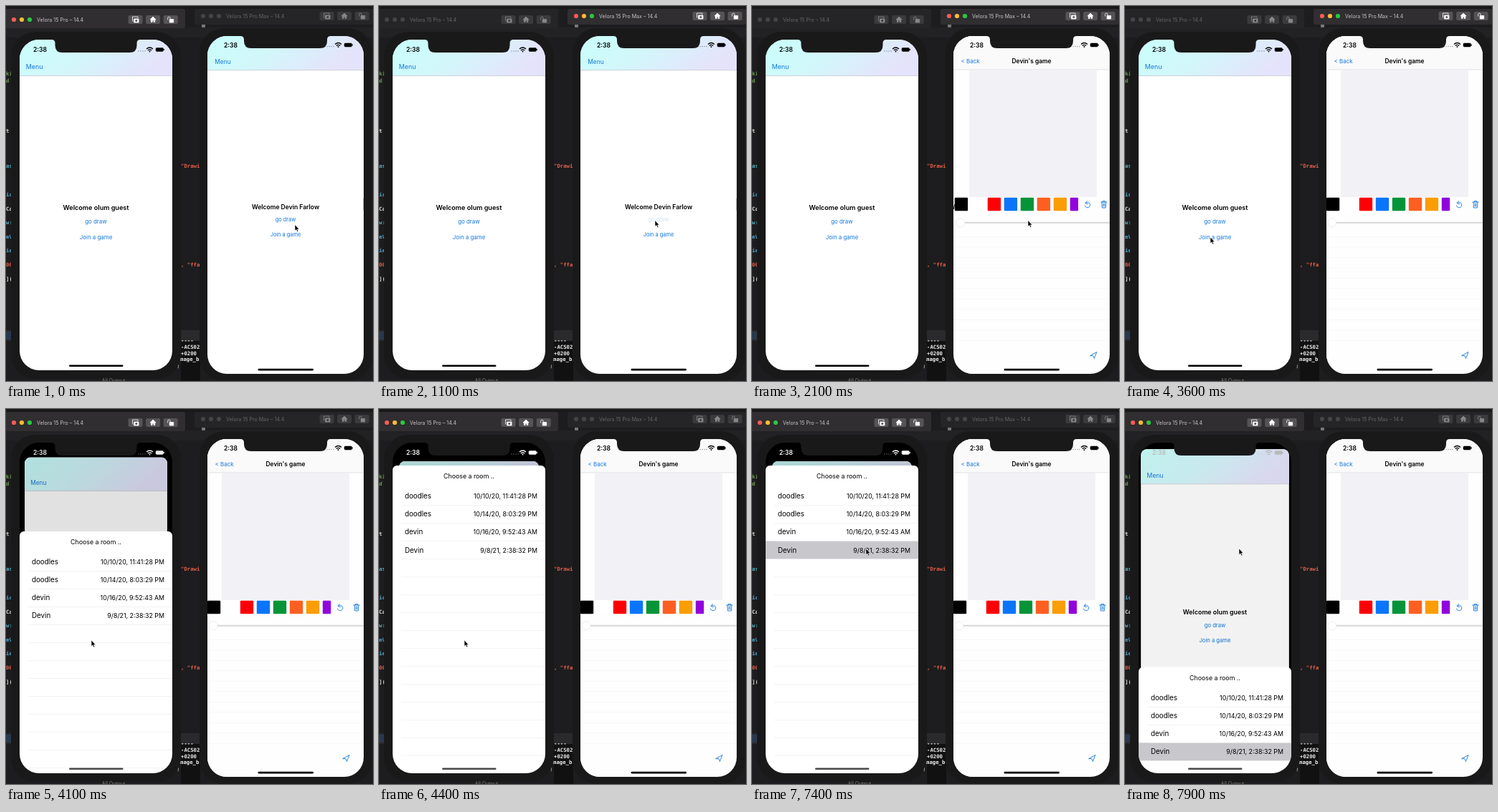
An HTML page that plays this animation: 512x524 px, repeating every 8 s.

```html
<!DOCTYPE html>
<html lang="en">
<head>
<meta charset="utf-8">
<style>
html, body { margin: 0; width: 100%; height: 100%; overflow: hidden; background: #1d1c1e; }
svg { display: block; font-family: Inter, sans-serif; }
.code { font: bold 7.3px "DejaVu Sans Mono", monospace; }
.mid { text-anchor: middle; }
.end { text-anchor: end; }
.bold { font-weight: 600; }
.link { fill: #1478dc; }
.icon { fill: none; stroke: #1478dc; stroke-width: .9; stroke-linejoin: round; stroke-linecap: round; }
</style>
</head>
<body>
<script>
const BEZEL = '#1a191a';
const text = (x, y, size, str, cls = '', attrs = '') =>
  `<text x="${x}" y="${y}" font-size="${size}" class="${cls}" ${attrs}>${str}</text>`;
const rect = (x, y, w, h, fill, r = 0, attrs = '') =>
  `<rect x="${x}" y="${y}" width="${w}" height="${h}" rx="${r}" fill="${fill}" ${attrs}/>`;
const lines = (x, w, y, step, n, fill) =>
  Array.from({ length: n }, (_, i) => rect(x, y + i * step, w, .6, fill)).join('');

function titleBar(id, x, y, w, buttonX, title) {
  const lights = ['#fe5b53', '#fdbc2e', '#2ac840'].map((c, i) =>
    `<circle class="light" data-color="${c}" cx="${x + 11 * i}" cy="${y}" r="3.1"/>`).join('');
  const glyphs = [
    '<path d="M-4 2.500V-4H3.500V-2" fill="none"/><path d="M-2-1H4.500V4H-2Z" fill="#fff"/><circle cx="1.300" cy="1.500" r="1.500" fill="#555355" stroke="none"/>',
    '<path d="M-4 0 0-4 4 0H2.700V3.500H1V1H-1V3.500H-2.700V0Z" fill="#fff"/>',
    '<path d="M-1.500-.5H4V4H-1.500Z" fill="#fff"/><path d="M-4 .5V-2q0-2 1.700-2T-.5-2V-.5" fill="none"/>'
  ];
  const buttons = glyphs.map((g, i) => {
    const bx = buttonX + 24.6 * i;
    return rect(bx, y - 6, 20, 12, '#555355', 2) +
      `<g transform="translate(${bx + 10} ${y})" stroke="#fff" stroke-width=".8">${g}</g>`;
  }).join('');
  return `<g id="${id}">${rect(x - 12, 4, w, y + 8, '#302e30', 3, 'class="bar"')}${lights}
    ${text(x + 32, y + 2.6, 7.1, title, 'title', 'fill="#c9c7c9"')}<g class="buttons">${buttons}</g></g>`;
}

function notch(cx, half, y, h) {
  const a = cx - half, b = cx + half;
  return `<path fill="${BEZEL}" d="M${a - 5} ${y - 2}V${y}Q${a} ${y} ${a} ${y + 5}V${y + h - 10}q0 10 10 10
    H${b - 10}q10 0 10-10V${y + 5}q0-5 5-5V${y - 2}Z"/>`;
}

// Clock, signal dots, wifi and battery; y is the vertical centre.
const status = (id, x, right, y) => `<g id="${id}">
  ${text(x, y + 3.1, 8.6, '2:38', 'bold')}
  ${[0, 3, 6, 9].map(d => `<circle cx="${right - 35 + d}" cy="${y + 2}" r=".7" opacity=".45"/>`).join('')}
  <path d="M${right - 24} ${y - 1}q4.500-4 9 0M${right - 22.2} ${y + 1}q2.700-2.200 5.400 0" fill="none" stroke="currentColor" stroke-width="1.3"/>
  <circle cx="${right - 19.5}" cy="${y + 2.4}" r="1"/>
  <rect x="${right - 11}" y="${y - 2.5}" width="10.500" height="5" rx="1.400" stroke="currentColor" stroke-width=".5"/>
  <path d="M${right + .3} ${y - 1}v2" stroke="currentColor"/></g>`;

function home(id, x, y, w, h, bar, s, name, menuX, titleY) {
  const cx = x + w / 2;
  return rect(x, y, w, h, '#fff') + rect(x, y, w, bar, 'url(#sky)') + rect(x, y + bar, w, .7, '#b9bec8') +
    text(menuX, y + bar - 8.7 * s, 8.9 * s, 'Menu', 'link') +
    text(cx, titleY, 9.1 * s, `Welcome ${name}`, 'mid bold') +
    text(cx, titleY + 18.8 * s, 7.9 * s, 'go draw', 'mid link', `id="${id}Draw"`) +
    text(cx, titleY + 40.8 * s, 7.9 * s, 'Join a game', 'mid link', `id="${id}Join"`);
}

const swatches = ['#000', '#fff', '#fd0006', '#0a75fb', '#079439', '#fd5f21', '#fb9d04', '#9102dc'];
const game = `<g id="game">
  ${rect(281, 42, 218, 472, '#fefefe')}${rect(301, 90, 178, 177, '#f2f1f6')}
  ${swatches.map((c, i) => rect(280.8 + 23 * i, 267.8, i == 7 ? 11.4 : 18.4, 18.4, c, 1.2)).join('')}
  <path class="icon" d="M463.500 275.500a3.700 3.700 0 1 1-1 3.500M465.500 272.500 463 275.500l3.500 1.200"/>
  <path class="icon" d="M485 274h8M487.500 274v-1.500h3V274M486 274l.6 8h4.800l.6-8M488.200 276v4M489.900 276v4"/>
  ${rect(288, 301.8, 211, 2, '#d6d6d6', 1)}
  <circle cx="289" cy="303" r="6" fill="#fff" stroke="#e6e6e6" stroke-width=".7"/>
  ${lines(281, 218, 322, 14.5, 11, '#f6f6f7')}
  <path class="icon" d="M470 488.500 479 483.500 475.500 492.500 474 489Z"/></g>
  <g id="gameNav">${rect(281, 42, 218, 47, '#fafafb')}${rect(281, 88.6, 218, .7, '#d4d4d6')}
  ${text(291.5, 80, 8, '&lt; Back', 'link')}${text(390, 80.3, 8.4, "Devin's game", 'mid bold')}</g>`;

const rooms = [['doodles', '10/10/20, 11:41:28 PM'], ['doodles', '10/14/20, 8:03:29 PM'],
  ['devin', '10/16/20, 9:52:43 AM'], ['Devin', '9/8/21, 2:38:32 PM']];
const sheet = `<g id="sheet">${rect(19, 79, 213, 460, '#fff', 6)}
  ${rect(19, 184.5, 213, 25, '#c8c7cc', 0, 'id="picked"')}
  ${text(125.5, 97, 8.8, 'Choose a room ..', 'mid')}
  ${lines(31, 201, 134.5, 25, 15, '#e9e9eb')}
  ${rooms.map(([name, date], i) => text(36, 125.2 + 25.1 * i, 9.8, name) +
    text(221, 125.2 + 25.1 * i, 8.85, date, 'end')).join('')}</g>`;

const snippets = [
  [0, 97, '#6a9a50', 'ki'], [0, 107, '#6a9a50', 'd'], [0, 177, '#ddd', 't'], [0, 226, '#4fb0bc', 'as'],
  [0, 266, '#4fa8d0', 'ic'], [0, 286, '#ddd', 'Ca'], [0, 305, '#4fb0bc', 'w:'], [0, 325, '#4fa8d0', 'eV'],
  [0, 344, '#4fa8d0', 'ie'], [0, 364, '#e0604a', '00'], [0, 384, '#ddd', ']('],
  [244, 226, '#e0604a', '"Drawi'], [244, 364, '#e0604a', ', "ffa'],
  [244, 470, '#eee', ' ----'], [244, 479, '#eee', '-ACS02'], [244, 488, '#eee', '+0200'], [243, 496, '#eee', 'mage_b.'], [238, 506, '#eee', '!']
];

document.body.innerHTML = `<svg width="512" height="524" viewBox="0 0 512 524"><defs>
  <linearGradient id="sky" x2="1" y2=".25"><stop stop-color="#c8fffb"/><stop offset=".5" stop-color="#d3f6fb"/><stop offset="1" stop-color="#e5e3fb"/></linearGradient>
  <clipPath id="leftClip">${rect(19, 47, 213, 462, '#fff', 27)}</clipPath>
  <clipPath id="backClip">${rect(19, 47, 213, 500, '#fff', 9)}</clipPath>
  <clipPath id="rightClip">${rect(281, 42, 218, 472, '#fff', 27)}</clipPath></defs>
  ${rect(0, 0, 512, 524, '#1d1c1e')}${rect(0, 0, 512, 4, '#1a191a')}
  ${rect(0, 30, 512, 14, '#222123')}${rect(0, 453, 271, 15, '#2a292b')}${rect(0, 455, 7, 11, '#28384e')}${rect(244, 468, 27, 56, '#111')}
  ${snippets.map(([x, y, c, s]) => text(x, y, 7.3, s, 'code', `fill="${c}"`)).join('')}
  ${rect(7, 36, 237, 485, BEZEL, 34)}${rect(270, 31, 241, 493, BEZEL, 34)}
  ${text(150, 526, 7, 'All Output', 'mid', 'fill="#777"')}
  <circle cx="248" cy="8" r="1.300" fill="#b8a040"/>${rect(273, 25, 5, 5, '#777', 1)}
  ${titleBar('leftBar', 11, 19, 251, 170.5, 'Velora 15 Pro – 14.4')}
  ${titleBar('rightBar', 275, 14, 249, 437.5, 'Velora 15 Pro Max – 14.4')}
  <g clip-path="url(#leftClip)">${rect(19, 47, 213, 462, '#000')}
    <g id="back"><g id="backScreen">${home('left', 19, 47, 213, 462, 50, 1, 'olum guest', 27.8, 284.7)}
    ${rect(19, 47, 213, 500, '#000', 0, 'id="shade"')}</g></g>
    ${status('leftStatus', 38, 220, 61)}${sheet}${rect(88, 501.5, 75.5, 2.6, '#000', 1.3, 'id="leftHome"')}</g>
  ${notch(125.5, 57, 47, 18)}
  <g clip-path="url(#rightClip)"><g id="rightBack">${home('right', 281, 42, 218, 472, 47, .94, 'Devin Farlow', 291.3, 283.8)}</g>
    ${game}${status('rightStatus', 304, 483, 54.5)}${rect(351.5, 506.8, 77.5, 2.6, '#000', 1.3)}</g>
  ${notch(390, 58, 42, 17)}
  <path id="cursor" d="M0 0V8.600L2 6.900 3.400 10 4.800 9.400 3.500 6.400H6Z" fill="#000" stroke="#fff" stroke-width=".6"/>
</svg>`;

const el = id => document.getElementById(id);
const set = (id, attrs) => { for (const k in attrs) el(id).setAttribute(k, attrs[k]); };
const span = (t, from, to) => Math.min(1, Math.max(0, (t - from) / (to - from)));
const smooth = u => u * u * (3 - 2 * u);
const within = (t, a, b) => t >= a && t < b;

function setActive(id, on) {
  const bar = el(id);
  bar.querySelector('.bar').setAttribute('fill', on ? '#302e30' : '#252426');
  bar.querySelector('.title').setAttribute('opacity', on ? 1 : .4);
  bar.querySelector('.buttons').setAttribute('opacity', on ? 1 : .45);
  bar.querySelectorAll('.light').forEach(l => l.setAttribute('fill', on ? l.dataset.color : '#454345'));
}

// Pointer moves: start, end, x, y
const moves = [[100, 800, 385, 299.5], [2600, 3400, 119, 323], [5300, 5850, 79, 200], [6400, 7100, 159, 195]];

function draw(t) {
  const rightActive = within(t, 1000, 3700);
  setActive('leftBar', !rightActive);
  setActive('rightBar', rightActive);
  set('rightDraw', { opacity: within(t, 1000, 1300) ? .2 : 1 });
  set('leftJoin', { opacity: within(t, 3700, 3900) ? .2 : 1 });

  const push = 1 - (1 - span(t, 1650, 2250)) ** 3.4;
  set('game', { transform: `translate(${218 * (1 - push)})` });
  set('gameNav', { opacity: Math.min(1, push * 1.05) });
  set('rightBack', { transform: `translate(${-65 * push})` });

  const shown = t < 6000 ? 1 - (1 - span(t, 3900, 4400)) ** 3 : 1 - smooth(span(t, 7550, 8130));
  const scale = 1 - .084 * shown;
  set('sheet', { transform: `translate(0 ${430 * (1 - shown)})` });
  set('back', { transform: `translate(${125.5 * (1 - scale)} ${47 * (1 - scale) + 26 * shown}) scale(${scale})` });
  set('backScreen', { 'clip-path': shown ? 'url(#backClip)' : 'none' });
  set('shade', { opacity: .15 * shown });
  set('picked', { opacity: t >= 7400 ? 1 : 0 });
  const grey = Math.round(255 * shown ** .3), ink = `rgb(${grey},${grey},${grey})`;
  set('leftStatus', { fill: ink, color: ink });
  set('leftHome', { fill: shown > .2 ? '#4a4a4a' : '#000' });

  let x = 403, y = 305.5;
  for (const [from, to, nx, ny] of moves) {
    const u = smooth(span(t, from, to));
    x += (nx - x) * u;
    y += (ny - y) * u;
  }
  set('cursor', { transform: `translate(${x} ${y})` });
}

function loop() {
  draw(performance.now() % 8000);
  requestAnimationFrame(loop);
}
loop();
</script>
</body>
</html>
```
